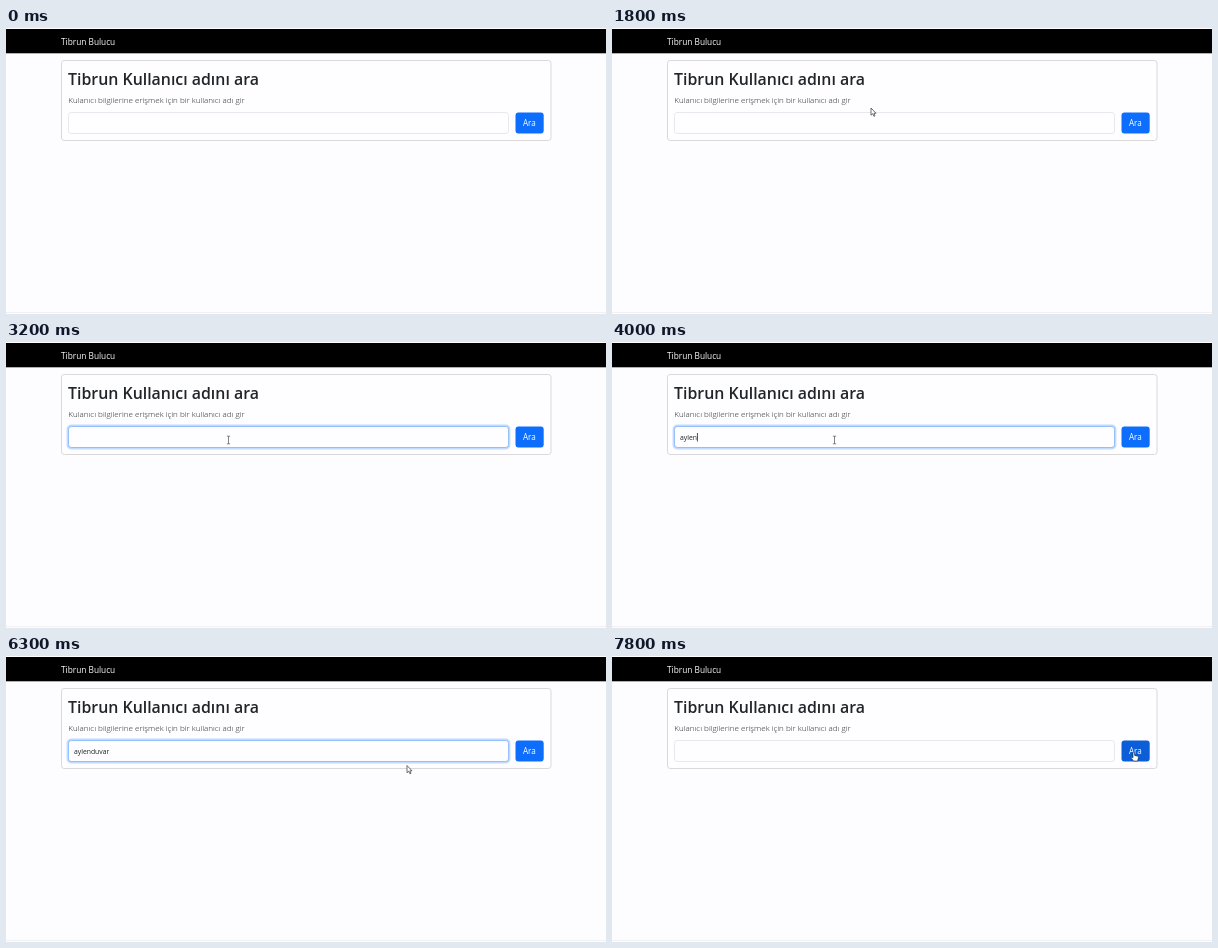
Write an HTML page that moves like this. It is 600x286 px and loops after 8000 ms.

```html
<!DOCTYPE html>
<html lang="tr">
<head>
<meta charset="utf-8">
<title>Kullanıcı arama</title>
<style>
  html, body { margin: 0; width: 100%; height: 100%; overflow: hidden; background: #fdfcfe; }
  svg { display: block; width: 600px; height: 286px; }
  text { font-family: "Open Sans", "Noto Sans", sans-serif; fill: #212529; }
</style>
</head>
<body>
<svg viewBox="0 0 600 286">
  <rect y="1" width="600" height="24.3"/>
  <path d="M0 284.5H600" stroke="#f1f0f3"/>
  <text x="55" y="16.8" font-size="8.3" style="fill:#fff">Tibrun Bulucu</text>

  <rect x="55.5" y="32.5" width="489.5" height="80" rx="2.7" fill="#fefdff" stroke="#d9d9dc"/>
  <text x="62" y="57" font-size="15.9" font-weight="600">Tibrun Kullanıcı adını ara</text>
  <text x="62.3" y="74.6" font-size="8.05" font-weight="300">Kulanıcı bilgilerine erişmek için bir kullanıcı adı gir</text>

  <rect x="62.5" y="84.5" width="440" height="21" rx="2.7" fill="#fefdff" stroke="#e2e4e9" stroke-width=".8"/>
  <g id="ring" fill="none">
    <rect x="61.6" y="83.6" width="441.8" height="22.8" rx="3.4" stroke="#c2dbfe" stroke-width="2"/>
    <rect x="62.5" y="84.5" width="440" height="21" rx="2.7" stroke="#86b7fe" stroke-width=".8"/>
  </g>
  <text id="field" x="68" y="97.7" font-size="6.8"></text>
  <path id="squiggle" fill="none" stroke="#e08a8a" stroke-width=".6"/>
  <path id="caret" d="M.5 91V99.5" stroke="#222" stroke-width=".8"/>

  <rect id="button" x="509.5" y="84.5" width="28.2" height="21" rx="2.9"/>
  <text x="517" y="98.4" font-size="8.1" style="fill:#fff">Ara</text>

  <g id="arrow" class="cursor">
    <path d="M0 0V7.2L1.7 5.7L2.9 8.3L4 7.8L2.9 5.3H5Z" fill="#fff" stroke="#333" stroke-width=".7"/>
  </g>
  <g id="beam" class="cursor">
    <path d="M-1.6 -3.8H1.6M0 -3.8V3.8M-1.6 3.8H1.6" fill="none" stroke="#666" stroke-width=".8"/>
  </g>
  <g id="hand" class="cursor">
    <path d="M-.8 .7Q0 -.4 .8 .7V3.4L4 4.2Q4.8 4.5 4.6 5.6L3.8 9H-.2L-2.6 5.9Q-2.6 4.8 -1.6 5.2L-.8 5.9Z"
          fill="#fff" stroke="#222" stroke-width=".6"/>
  </g>
</svg>
<script>
const LOOP = 8000, STEP = 100;
const USERNAME = "aylenduvar";
const [SHOW, FOCUS, SUBMIT] = [1500, 2600, 7400];

// Time at which each letter is typed
const keyTimes = [3600, 3800, 3900, 4000, 4000, 4300, 4500, 4800, 5000, 5400];

// Pointer path: time, x, y
const path = [
  [1500, 247, 134], [1600, 252, 112], [1700, 257, 90], [1800, 259, 80],
  [1900, 259, 80], [2100, 251, 86], [2500, 222.5, 98], [5800, 222.5, 98],
  [6000, 275, 105], [6300, 401, 109.5], [6700, 504, 111],
  [6800, 513, 104], [7100, 521.8, 96]
];

const el = id => document.getElementById(id);
const show = (id, on) => el(id).style.display = on ? "" : "none";
const clamp = v => Math.max(0, Math.min(1, v));
const inside = (x, y, left, right) => x > left && x < right && y > 84 && y < 106;

function pointerAt(t) {
  const next = path.findIndex(p => p[0] > t);
  if (next < 0) return path[path.length - 1].slice(1);
  if (next === 0) return path[0].slice(1);
  const [t0, x0, y0] = path[next - 1], [t1, x1, y1] = path[next];
  const k = (t - t0) / (t1 - t0);
  return [x0 + (x1 - x0) * k, y0 + (y1 - y0) * k];
}

function render(t) {
  const [x, y] = pointerAt(t);
  const overButton = t >= SHOW && inside(x, y, 509, 538);
  const kind = overButton ? "hand" : inside(x, y, 62, 503) ? "beam" : "arrow";
  for (const id of ["arrow", "beam", "hand"]) {
    show(id, t >= SHOW && id === kind);
    el(id).setAttribute("transform", `translate(${x} ${y})`);
  }
  el("button").setAttribute("fill", overButton ? "#0b5ed7" : "#0d6efd");
  el("ring").style.opacity = clamp((t - FOCUS) / 300) * clamp((SUBMIT + 200 - t) / 200);

  const typed = t < SUBMIT ? keyTimes.filter(k => k <= t).length : 0;
  const field = el("field");
  field.textContent = USERNAME.slice(0, typed);
  const end = 68 + (typed ? field.getComputedTextLength() : 0);
  show("caret", (t > FOCUS && t < 3200) || (t >= 3600 && t < 5900));
  el("caret").setAttribute("transform", `translate(${end} 0)`);
  show("squiggle", t >= 6700 && typed);
  let wave = "M68 100";
  for (let px = 69, i = 0; px < end; px++, i++) wave += `L${px} ${i % 2 ? 100 : 99.3}`;
  el("squiggle").setAttribute("d", wave);
}

const start = performance.now();
function frame() {
  const t = (performance.now() - start) % LOOP;
  render(Math.floor(t / STEP) * STEP);
  requestAnimationFrame(frame);
}
frame();
</script>
</body>
</html>
```
